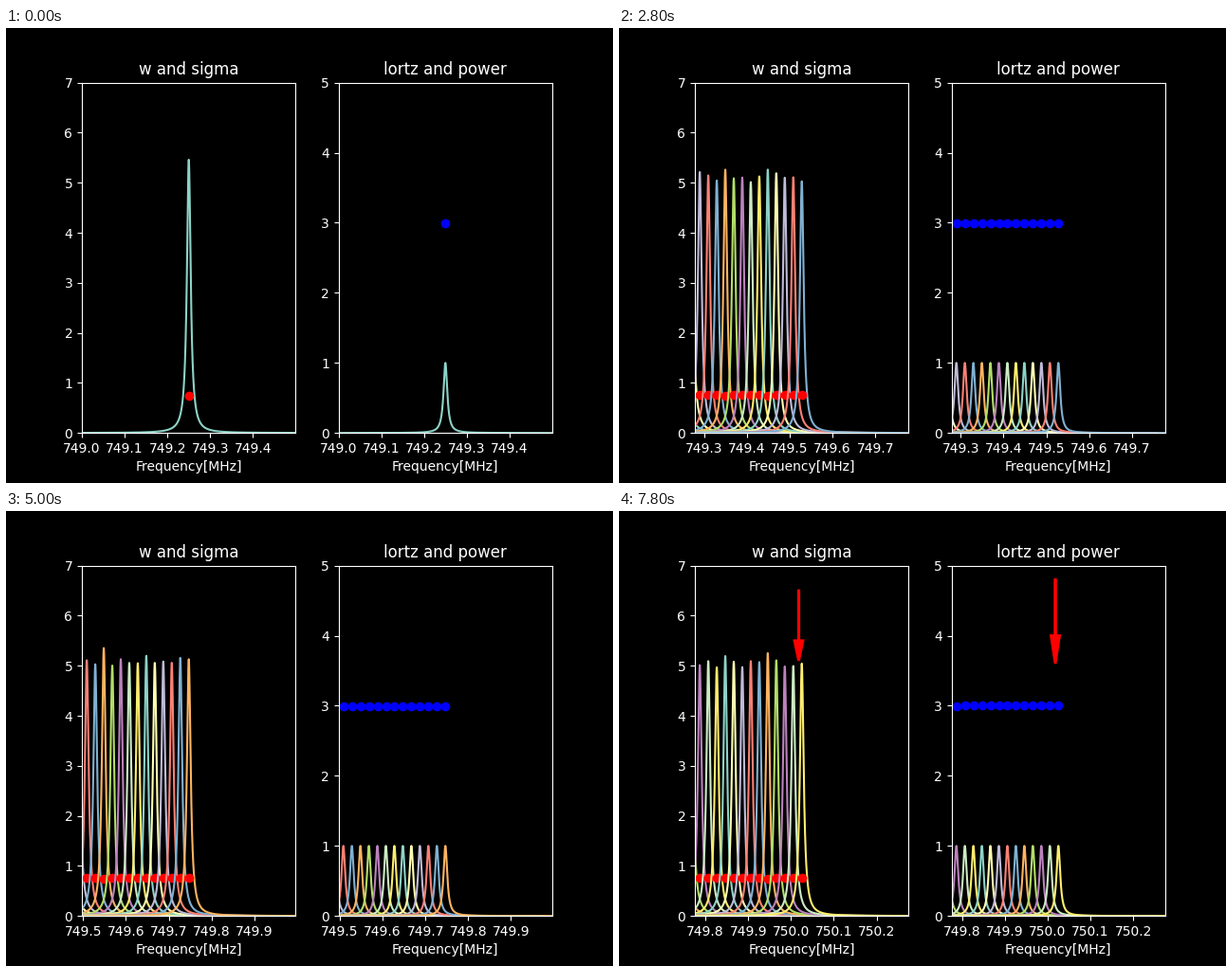
Recreate the animation shown at these times as a matplotlib script. Size 640x480 px, loop 8 s.

```python
import numpy as np
import matplotlib.pyplot as plt
from matplotlib.animation import FuncAnimation
from matplotlib.ticker import FormatStrFormatter, MultipleLocator

plt.style.use("dark_background")
plt.rcParams["font.family"] = "DejaVu Sans"

COUNT = 40
START, STEP, HALF = 749.2499, 0.01988, 0.25   # MHz
GAMMA = 0.0053                                # half width of each resonance
MARK = 750.018                                # frequency the arrows point at


def peak_heights():
    """Slow decline with a five-step ripple, an initial transient and noise."""
    k = np.arange(COUNT)
    turn = 2 * np.pi * k / 5
    ripple = 0.07 * np.cos(turn) + 0.05 * np.cos(2 * turn)
    noise = np.random.default_rng(4).normal(0, 0.05, COUNT)
    noise[0] = 0
    return 5.15 - 0.002 * k + 0.19 * np.exp(-k) + ripple + noise


def center(k):
    return START + STEP * k


def sigma(peak):
    return np.sqrt(2.95 / peak)


def power(k):
    return 2.99 if k < 28 else 3.0


def setup(ax, title, top):
    ax.set_title(title)
    ax.set_xlabel("Frequency[MHz]")
    ax.set_ylim(0, top)
    ax.yaxis.set_major_locator(MultipleLocator(1))
    ax.xaxis.set_major_locator(MultipleLocator(0.1))
    ax.xaxis.set_major_formatter(FormatStrFormatter("%.1f"))


def add_arrow(ax, y, dy):
    ax.arrow(MARK, y, 0, dy, width=0.001, head_width=0.02,
             head_length=0.4, color="red", linewidth=2)


fig, (left, right) = plt.subplots(1, 2, figsize=(6.4, 4.8), dpi=100)
setup(left, "w and sigma", 7)
setup(right, "lortz and power", 5)
add_arrow(left, 6.5, -1.0)
add_arrow(right, 4.8, -0.8)

offset = np.linspace(-HALF, HALF, 1001)
shape = 1 / (1 + (offset / GAMMA) ** 2)

steps = []
for k, peak in enumerate(peak_heights()):
    c = center(k)
    steps.append(
        left.plot(c + offset, peak * shape)
        + left.plot(c, sigma(peak), "o", color="red")
        + right.plot(c + offset, shape)
        + right.plot(c, power(k), "o", color="blue")
    )


def update(i):
    for k, artists in enumerate(steps):
        for artist in artists:
            artist.set_visible(k <= i)
    c = center(i)
    for ax in (left, right):
        ax.set_xlim(c - HALF, c + HALF)
    return []


anim = FuncAnimation(fig, update, frames=COUNT, interval=200,
                     init_func=lambda: update(0), repeat=True,
                     repeat_delay=0, blit=False)
plt.show()
```
